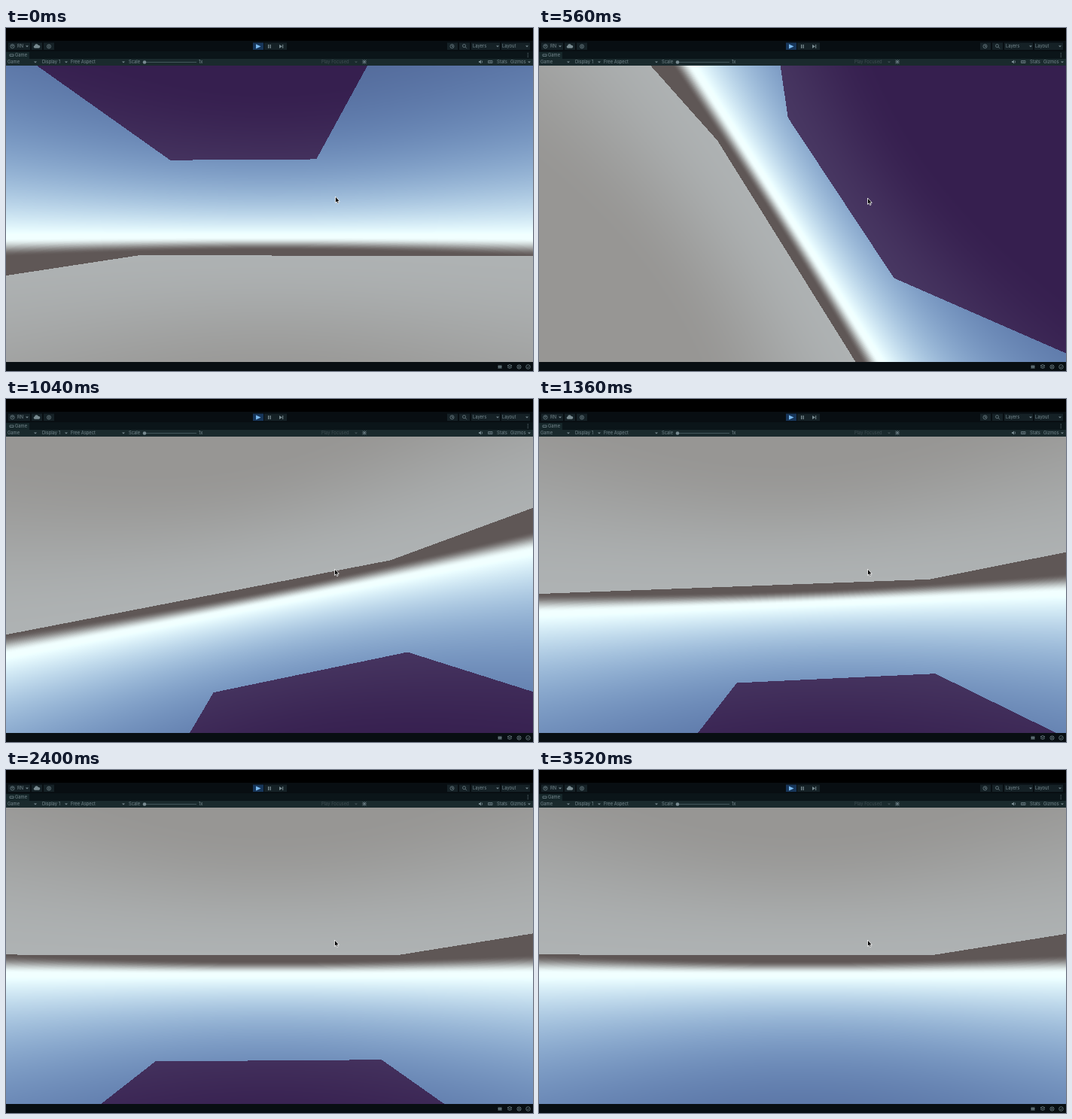
An HTML page with a canvas that plays this animation: 700x456 px, repeating every 3.6 s.

```html
<!DOCTYPE html>
<html lang="en">
<head>
<meta charset="utf-8">
<title>Gravity flip</title>
<style>
  html, body { margin: 0; width: 100%; height: 100%; overflow: hidden; background: #000; }
  canvas, svg { position: absolute; left: 0; }
  canvas { top: 50px; }
  svg { top: 0; }
  text { font: 5.8px Inter, sans-serif; fill: #788a90; }
  .dim { fill: #414f54; }
  .icon { fill: none; stroke: #71848b; stroke-width: .8; }
  .solid { fill: #788a90; }
  .button { fill: #152126; }
</style>
</head>
<body>
<canvas id="view" width="700" height="394"></canvas>
<svg width="700" height="456" viewBox="0 0 700 456">
  <rect y="17" width="700" height="14" fill="#080e12"/>
  <rect y="31" width="700" height="10" fill="#0b1519"/>
  <rect y="32" width="31" height="9" fill="#16272a"/>
  <rect y="41" width="700" height="9" fill="#1a2a2d"/>
  <rect y="444" width="700" height="12" fill="#080e12"/>
  <g class="button">
    <rect x="3" y="19.5" width="29" height="9.5"/><rect x="34" y="19.5" width="14" height="9.5"/>
    <rect x="50" y="19.5" width="14" height="9.5"/><rect x="343" y="19.5" width="30" height="9.5"/>
    <rect x="586" y="19.5" width="14" height="9.5"/><rect x="602" y="19.5" width="14" height="9.5"/>
    <rect x="618" y="19.5" width="38" height="9.5"/><rect x="658" y="19.5" width="38" height="9.5"/>
  </g>
  <!-- play, pause, step -->
  <rect x="328" y="19.5" width="14" height="9.5" fill="#17365a"/>
  <path fill="#79b8ee" d="M332 21.5l6.5 3-6.5 3z"/>
  <path class="solid" d="M348 22h1.300v5h-1.300zm2.500 0h1.300v5h-1.300zM363 22l4 2.500-4 2.500zm4.200 0h1v5h-1z"/>
  <!-- toolbar icons -->
  <g class="icon">
    <circle cx="8.500" cy="24.300" r="2.600"/><circle cx="8.500" cy="23.700" r=".8"/>
    <circle cx="57" cy="24.500" r="2.500"/><circle cx="57" cy="24.500" r=".8"/>
    <circle cx="592.500" cy="24.300" r="2.500"/><path d="M592.500 22.700v1.800h1.500"/>
    <circle cx="608.500" cy="23.700" r="2"/><path d="M610 25.200l2 2"/>
    <path d="M5 35h5v2.500h-5zM640.500 43.500h5.500v3h-5.500zm1 1.500h3.500"/>
    <path d="M473.500 42.500l5 5m0-5l-5 5m-.5-2.500h6m-3-3v6"/>
    <path d="M632 43.300q1.500 1.700 0 3.400"/>
  </g>
  <path class="solid" d="M38 26.700a1.700 1.700 0 0 1 0-3.300 2.600 2.600 0 0 1 5-.3 1.800 1.800 0 0 1 .8 3.600zM628 44h1.300l1.700-1.500v5l-1.700-1.500H628z"/>
  <path class="solid" d="M692.700 33.300h1v1h-1zm0 2.200h1v1h-1zm0 2.200h1v1h-1z"/>
  <!-- scale slider -->
  <path stroke="#43565b" d="M182 45.500h71"/>
  <circle class="solid" cx="184" cy="45.500" r="2.300"/>
  <g id="arrows"></g>
  <text x="15" y="26.400">RN</text>
  <text x="620" y="26.400">Layers</text>
  <text x="659" y="26.400">Layout</text>
  <text x="12" y="38.200">Game</text>
  <text x="2" y="47.400">Game</text>
  <text x="48" y="47.400">Display 1</text>
  <text x="86" y="47.400">Free Aspect</text>
  <text x="163" y="47.400">Scale</text>
  <text x="256" y="47.400">1x</text>
  <text class="dim" x="419" y="47.400">Play Focused</text>
  <text x="652" y="47.400">Stats</text>
  <text x="670" y="47.400">Gizmos</text>
  <!-- status icons -->
  <g class="icon">
    <path d="M653.500 448l5 5m0-5l-5 5m-.5-2.500h6"/><circle cx="656" cy="450.500" r="1.800"/>
    <path d="M666 449l3-1.500 3 1.500-3 1.500zm0 2l3 1.500 3-1.500"/>
    <circle cx="681.500" cy="450.500" r="2.600"/><path d="M680 449l3 3m0-3l-3 3"/>
    <circle cx="693.500" cy="450.500" r="2.800"/><path d="M692 450.500l1.200 1.200 1.800-2.200"/>
  </g>
  <path id="cursor" d="M0 0v8.500l1.900-1.700 1.300 2.800 1.400-.6-1.200-2.700h2.400z" fill="#000" stroke="#fff" stroke-width=".8"/>
</svg>
<script>
const LOOP = 3600, STEP = 80;
const WIDTH = 700, HEIGHT = 394, FOCAL = 341, YAW = 0.022, PITCH = 0.081;
// World units are ceiling widths.
const ROOM = 3.73, FLOOR_FAR = 40, FLOOR_LEFT = -21, HEAD = 0.13;
const SHADES = 1024;

const ctx = document.getElementById('view').getContext('2d');
const cursor = document.getElementById('cursor');
const image = ctx.createImageData(WIDTH, HEIGHT);
const pixels = new Uint32Array(image.data.buffer);

const ramp = (v, from, to) => Math.max(0, Math.min(1, (v - from) / (to - from)));
const smooth = (v, from, to) => { const k = ramp(v, from, to); return k * k * (3 - 2 * k); };
const mix = (a, b, k) => a.map((v, i) => v + (b[i] - v) * k);
const fade = (low, range, rate, v) => Math.min(255, low + range * Math.exp(-rate * v));

// Colours by slope of the view ray, from -1 (down) to 1 (up).
function shades(colour) {
  return Uint32Array.from({ length: 2 * SHADES + 1 }, (_, i) => {
    const [r, g, b] = colour(i / SHADES - 1).map(Math.round);
    return (255 << 24 | b << 16 | g << 8 | r) >>> 0;
  });
}

const sky = shades(v => {
  const e = Math.max(0, v);
  const air = [fade(78, 163, 5, e), fade(96, 162, 4, e), fade(138, 120, 2.9, e)];
  return mix(air, [95, 87, 86], smooth(-v, .01, .06));
});
const ground = shades(v => mix([174, 178, 179], [151, 150, 148], smooth(-v, .05, .6)));
const ceiling = shades(v => mix([74, 58, 100], [54, 31, 79], smooth(v, .1, .6)));

// Fall towards the ceiling, roll over, then walk on it.
function pose(t) {
  const roll = Math.PI * (1 - Math.exp(-Math.max(0, t - .483) / .2));
  const gap = .24 + .3 * (1 - ramp(t, 0, .36)) + .1 * (1 - ramp(t, .7, 1));
  const side = .22 - .04 * ramp(t, 0, 2) - .4 * ramp(t, 2.1, 2.88) + .45 * ramp(t, 2.9, 3.5);
  const edge = 1.712 - .394 * ramp(t, 0, .555) - .6 * ramp(t, 2.1, 3.3);
  return { roll, gap, side, edge };
}

function render(t) {
  const { roll, gap, side, edge } = pose(t);
  const cos = Math.cos(roll), sin = Math.sin(roll);
  const cosPitch = Math.cos(PITCH), sinPitch = Math.sin(PITCH);
  const camX = side - HEAD * sin, above = gap - HEAD * cos, below = ROOM - above;

  for (let py = 0, i = 0; py < HEIGHT; py++) {
    const sy = HEIGHT / 2 - py - .5;
    const lift = sy * cosPitch + FOCAL * sinPitch, ahead = FOCAL * cosPitch - sy * sinPitch;
    for (let px = 0; px < WIDTH; px++, i++) {
      const sx = px + .5 - WIDTH / 2;
      const x = sx * cos - lift * sin, up = sx * sin + lift * cos;
      const dx = x - ahead * YAW, dz = ahead + x * YAW;
      let tone = sky;
      if (up < 0) {
        const s = -below / up;
        if (s * dz < FLOOR_FAR && s * dx + camX > FLOOR_LEFT) tone = ground;
      } else {
        const s = above / up;
        if (s * dz < edge && Math.abs(s * dx + camX) < .5) tone = ceiling;
      }
      const slope = Math.max(-1, Math.min(1, up / Math.sqrt(x * x + ahead * ahead)));
      pixels[i] = tone[Math.round((slope + 1) * SHADES)];
    }
  }
  ctx.putImageData(image, 0, 0);
  cursor.setAttribute('transform', t < .16 ? 'translate(437.500 224)' : 'translate(436.500 226)');
}

const arrowsAt = (y, ...xs) => xs.map(x => `<path class="solid" d="M${x} ${y}h4l-2 2z"/>`).join('');
document.getElementById('arrows').innerHTML =
  arrowsAt(23.5, 26, 651, 690) + arrowsAt(44.5, 37, 78, 154, 693) +
  '<path class="dim" d="M463 44.500h4l-2 2z"/>';

let shown = -1;
function tick() {
  const step = Math.floor(performance.now() % LOOP / STEP);
  if (step !== shown) render((shown = step) * STEP / 1000);
  requestAnimationFrame(tick);
}
tick();
</script>
</body>
</html>
```
